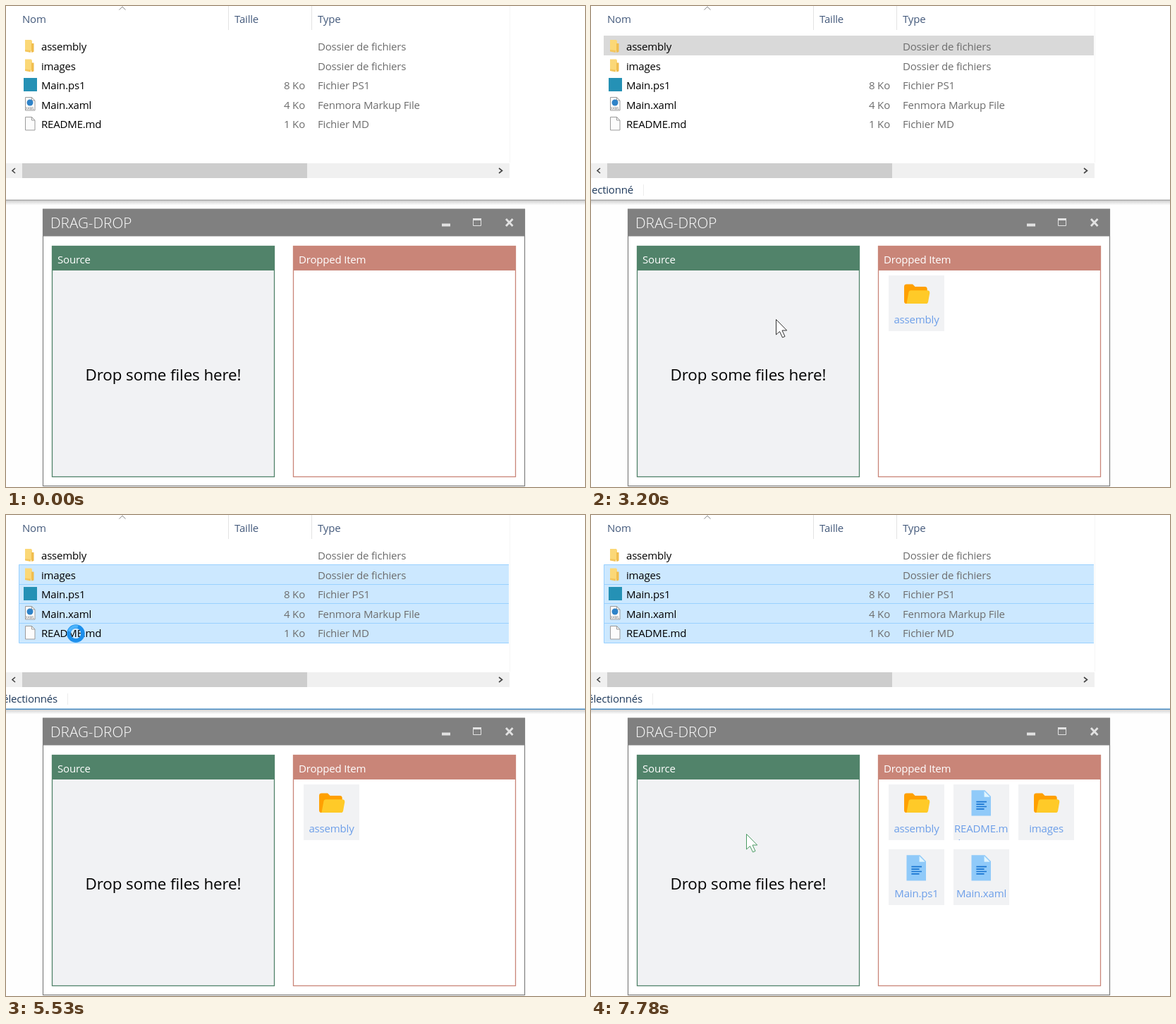
Animation of 821x682 px, one loop 8000 ms. Source, as an HTML page:

```html
<!DOCTYPE html>
<html lang="fr">
<head>
<meta charset="utf-8">
<title>Drag and drop</title>
<style>
html, body { margin: 0; width: 100%; height: 100%; overflow: hidden; background: #fefefe; }
svg { display: block; width: 100vw; height: 100vh; }
text { font: 15px "Open Sans", "Noto Sans", sans-serif; letter-spacing: -.19px; fill: #6d6d6d; white-space: pre; }
.head { fill: #43597b; }
.name { fill: #000; }
.status { fill: #1e395b; }
.white { fill: #fff; }
.title { font-size: 20.7px; font-weight: 300; fill: #fff; letter-spacing: 0; }
.big { font-size: 22.4px; fill: #000; letter-spacing: -.1px; }
.label { fill: #6d9fe9; }
.tiny { font-size: 4.5px; letter-spacing: 0; }
.badge { font-size: 15px; font-weight: 700; fill: #fff; }
.end { text-anchor: end; }
.mid { text-anchor: middle; }
</style>
</head>
<body>
<svg id="stage" viewBox="0 0 821 682" xmlns="http://www.w3.org/2000/svg"></svg>
<script>
const rect = (x, y, w, h, fill, extra = '') =>
  `<rect x="${x}" y="${y}" width="${w}" height="${h}" fill="${fill}" ${extra}/>`;
const path = (d, fill, stroke = 'none', width = 1) =>
  `<path d="${d}" fill="${fill}" stroke="${stroke}" stroke-width="${width}"/>`;
const text = (x, y, cls, str, extra = '') => `<text x="${x}" y="${y}" class="${cls}" ${extra}>${str}</text>`;
const group = (id, body, extra = '') => `<g id="${id}" ${extra}>${body}</g>`;

const rowTops = [42, 70, 98, 125, 153, 181];
const files = [
  ['assembly', '', 'Dossier de fichiers'],
  ['images', '', 'Dossier de fichiers'],
  ['Main.ps1', '8 Ko', 'Fichier PS1'],
  ['Main.xaml', '4 Ko', 'Fenmora Markup File'],
  ['README.md', '1 Ko', 'Fichier MD'],
];

// Small list icons
const smallFolder = y =>
  path(`M27 ${y}h9l1 2v14l-10-1z`, '#fbd877') +
  path(`M36 ${y + 5}h3.5v12l-3.5 1z`, '#f0bd4e') +
  path(`M27 ${y + 14}l8 1v3l-8-1.5z`, '#f4c65c');
const smallPaper = y =>
  path(`M27.5 ${y}h9l4.5 4.5v14h-13.5z`, '#fcfcfc', '#9b9b9b') +
  path(`M36.5 ${y}v4.5h4.5`, 'none', '#9b9b9b');
const icons = smallFolder(48) + smallFolder(75.5) +
  rect(25, 102, 19, 19, '#2591b5') +
  smallPaper(129.5) + '<circle cx="34" cy="137" r="4.5" fill="#2f83c8"/>' +
  text(34, 146.5, 'tiny mid', 'XAML') +
  smallPaper(157.5);

const explorer =
  rect(0, 0, 821, 275, '#fff') +
  rect(315, 0, 1, 34, '#e3e3e3') + rect(433, 0, 1, 34, '#e3e3e3') + rect(714, 0, 1, 222, '#f5f5f5') +
  path('M160.5 5.5l4.5-4.5 4.5 4.5', 'none', '#8a8a8a') +
  text(23, 24, 'head', 'Nom') + text(324, 24, 'head', 'Taille') + text(442, 24, 'head', 'Type') +
  files.map((f, i) => rect(18, rowTops[i], 695, rowTops[i + 1] - rowTops[i], 'none', `id="row${i}"`)).join('') +
  group('borders', '') + icons +
  files.map(([name, size, type], i) => {
    const y = 63 + 27.6 * i;
    return text(50, y, 'name', name) + text(424, y, 'end', size) + text(442, y, '', type);
  }).join('') +
  rect(0, 223, 714, 21, '#f0f0f0') + rect(23, 223, 404, 21, '#cdcdcd') +
  path('M13 230l-4 3.5 4 3.5M699 230l4.5 3.5-4.5 3.5', 'none', '#444', 1.6) +
  text(60, 266, 'status end', '', 'id="status"') +
  rect(74, 253, 1, 16, '#ededed', 'id="divider"') +
  rect(0, 275.5, 821, 7, 'url(#shade)') + rect(0, 274.6, 821, 1.3, '#a0a0a0', 'id="edge"');

const panel = (x, color, fill, title) =>
  rect(x + .5, 340.5, 315, 327, fill, `stroke="${color}" stroke-width="1.3"`) +
  rect(x, 340, 316, 35, color) + text(x + 8, 365, 'white', title);

const app =
  rect(52.5, 288.5, 683, 392, '#fff', 'stroke="#7f7f7f" stroke-width="1.2"') +
  rect(52, 287.5, 684, 39, '#808080') + text(63, 314.5, 'title', 'DRAG-DROP') +
  rect(618, 308.5, 12, 4, '#e2e2e2') +
  path('M662.5 302h11v9.5h-11z', 'none', '#e2e2e2') + rect(662, 301, 12, 3, '#e2e2e2') +
  path('M709 302l9.5 10M718.5 302l-9.5 10', 'none', '#e2e2e2', 2.8) +
  panel(65, '#51836a', '#f1f2f4', 'Source') +
  panel(407, '#c98578', '#fff', 'Dropped Item') +
  text(223, 531, 'big mid', 'Drop some files here!');

// Dropped tiles, icons on a 48 unit grid
const folderIcon =
  path('M38 12H22l-4-4H8q-4 0-4 4v24q0 4 4 4h31q3 0 3-3V16q0-4-4-4z', '#ffa000') +
  path('M42.2 18H15.3q-3.3 0-3.9 3.3L8 40h31.7q3.3 0 3.9-3.3l2.5-14q.5-4.7-3.9-4.7z', '#ffca28');
const docIcon =
  path('M40 45H8V3h22l10 10z', '#90caf9') + path('M38.5 14H29V4.5z', '#e1f5fe') +
  path('M16 22h17M16 26h13M16 30h17M16 34h13', 'none', '#1976d2', 2);
const tile = (col, row, icon, label) =>
  `<g transform="translate(${422 + 92 * col} ${382 + 92 * row})" clip-path="url(#tileClip)">` +
  rect(0, 0, 79, 79, '#f1f2f4') + `<g transform="translate(18.6 5.7) scale(.86)">${icon}</g>${label}</g>`;
const centered = str => text(39.5, 68, 'label mid', str);

const tiles =
  group('firstTile', tile(0, 0, folderIcon, centered('assembly'))) +
  group('moreTiles',
    tile(1, 0, docIcon, text(1, 68, 'label', 'README.m') + text(1, 89, 'label', 'd')) +
    tile(2, 0, folderIcon, centered('images')) +
    tile(0, 1, docIcon, centered('Main.ps1')) +
    tile(1, 1, docIcon, centered('Main.xaml')));

// Drag ghosts, placed relative to the pointer tip
const ghostFrame =
  path('M-61 20.500H73.500V-113', 'none', 'rgba(0,0,0,.14)', 4) +
  rect(-63.5, -116.5, 136, 136, 'url(#glass)', 'rx="2" stroke="#b9d6e8" stroke-opacity=".7"');
const ghostOne = ghostFrame + '<g opacity=".75">' +
  path('M-24-98h38l8 8v84l-46-4z', '#fbd877') + path('M14-72h14v66l-14 8z', '#f0bd4e') + '</g>';
const ghostMany = ghostFrame + '<g opacity=".82">' +
  rect(-52, -95, 109, 88, '#21a3c8') +
  path('M-38-108h54l14 14v90h-68z', '#e9eef1', '#a9b2b8') +
  rect(-36, -96, 5, 91, '#f3dfa4') +
  path('M-31-95h57l23 23v81h-80z', '#f1f5f8', '#b0bbc2') +
  path('M26-95v23h23z', '#fff', '#a5b2ba') + '</g>' +
  rect(-4, -60, 15, 21, '#0078d7') + text(3.5, -43.5, 'badge mid', '4');

const pointer = group('arrow',
    path('M.5.5v21.500l5-4.500 4 8.500 3.500-1.500-4-8.500h6.700z', '#fff'), 'stroke-width="1"') +
  group('plus', rect(8.5, 21.5, 10, 10, '#fff', 'stroke="#333"') +
    path('M13.5 23.5v6M10.5 26.5h6', 'none', '#333', 1.3)) +
  group('forbid', '<circle r="9" fill="none" stroke="#222" stroke-width="2.5"/>' +
    path('M-6-6L6 6', 'none', '#222', 2.5)) +
  group('busy', '<circle r="10" fill="none" stroke="#1c8fec" stroke-width="5.5"/>' +
    path('M-9.5-3A10 10 0 0 1 3-9.5', 'none', '#4db4fb', 4), 'transform="translate(-1 1)"');

document.getElementById('stage').innerHTML = `<defs>
  <linearGradient id="shade" x2="0" y2="1"><stop stop-color="#cfcfcf"/><stop offset="1" stop-color="#fefefe"/></linearGradient>
  <radialGradient id="glass"><stop stop-color="#fff" stop-opacity=".75"/><stop offset="1" stop-color="#eef7fd" stop-opacity=".55"/></radialGradient>
  <clipPath id="tileClip"><rect width="79" height="79"/></clipPath></defs>` +
  rect(0, 0, 821, 682, '#fefefe') + explorer + app + tiles +
  group('pointer', group('ghostOne', ghostOne) + group('ghostMany', ghostMany) +
    '<circle id="press" r="16" fill="#f8ef2e" fill-opacity=".75"/>' + pointer);

const el = id => document.getElementById(id);
const show = (id, on) => el(id).setAttribute('display', on ? 'inline' : 'none');
const set = (id, name, value) => el(id).setAttribute(name, value);
el('arrow').firstChild.removeAttribute('stroke');

// Pointer moves: start, end, steps, points passed through
const moves = [
  [70, 860, 12, [[740, 690], [410, 350], [140, 110], [81, 62]]],
  [1330, 2120, 11, [[81, 62], [100, 120], [190, 300], [263, 442]]],
  [3200, 3200, 1, [[263, 442], [262, 444]]],
  [3300, 3980, 10, [[262, 444], [180, 270], [88, 125], [72, 89]]],
  [4210, 4610, 6, [[72, 89], [72, 89], [76, 122], [81, 154]]],
  [4760, 4840, 2, [[81, 154], [100, 167]]],
  [5700, 5840, 3, [[100, 167], [92, 168]]],
  [6160, 6570, 6, [[85, 170], [98, 192]]],
  [6640, 6940, 5, [[98, 192], [120, 233], [157, 313]]],
  [7010, 7470, 7, [[157, 313], [200, 405], [220, 451]]],
  [7780, 7780, 1, [[220, 451], [220, 452]]],
];
const within = (t, a, b) => t >= a && t < b;

function along(points, p) {
  const pos = p * (points.length - 1);
  const i = Math.min(Math.floor(pos), points.length - 2);
  return points[i].map((v, k) => v + (points[i + 1][k] - v) * (pos - i));
}

function pointerAt(t) {
  const move = moves.filter(m => m[0] <= t).pop() || moves[0];
  const [start, end, steps, points] = move;
  const done = end > start ? Math.floor((t - start) / (end - start) * (steps - 1) + 1e-6) + 1 : steps;
  return along(points, Math.min(done / steps, 1));
}

function rowColor(i, t, x, y) {
  if (t >= 5150) return i ? '#cce8ff' : 'none';
  if (t >= 3980 && i === 1) return '#cce8ff';
  if (within(t, 1330, 3980) && i === 0) return t < 1400 ? '#cce8ff' : '#d9d9d9';
  const over = within(y, rowTops[i], rowTops[i + 1]) && x < 713;
  const dragging = within(t, 1330, 2730);
  return t >= 70 && over && !dragging ? '#e5f3ff' : 'none';
}

function draw(t) {
  const [x, y] = pointerAt(t);
  const dragging = within(t, 1330, 2730) || within(t, 6160, 7780);
  const inList = y < 276;
  const blocked = dragging && within(y, 276, 376);
  const busy = within(t, 5530, 5700);

  // Selection frames stay open on the right, where the list is cut off
  let frames = '';
  files.forEach((f, i) => {
    const fill = rowColor(i, t, x, y);
    set('row' + i, 'fill', fill);
    if (fill === '#cce8ff')
      frames += path(`M713 ${rowTops[i] + .5}H18.5V${rowTops[i + 1] + .5}H713`, 'none', '#99d1ff');
  });
  el('borders').innerHTML = frames;

  const many = t >= 5150;
  el('status').textContent = t < 1330 ? '' : many ? 'sélectionnés' : 'sélectionné';
  set('status', 'x', many ? 73 : 60);
  set('divider', 'x', many ? 87 : 74);
  show('divider', t >= 1330);
  set('edge', 'fill', t >= 4210 ? '#2f7dbd' : '#a0a0a0');

  show('firstTile', t >= 2730);
  show('moreTiles', t >= 7780);

  show('pointer', t >= 70);
  set('pointer', 'transform', `translate(${Math.round(x)} ${Math.round(y)})`);
  show('ghostOne', dragging && !many && inList && y > 130);
  show('ghostMany', dragging && many && inList);
  show('press', within(t, 1330, 2730) || within(t, 5150, 5300) || within(t, 5840, 7780));
  show('arrow', !blocked && !busy);
  set('arrow', 'stroke', t >= 7780 ? '#4a9a62' : '#333');
  show('plus', dragging && y >= 376);
  show('forbid', blocked);
  show('busy', busy);
}

const begin = performance.now();
function tick() {
  draw((performance.now() - begin) % 8000);
  requestAnimationFrame(tick);
}
draw(0);
requestAnimationFrame(tick);
</script>
</body>
</html>
```
